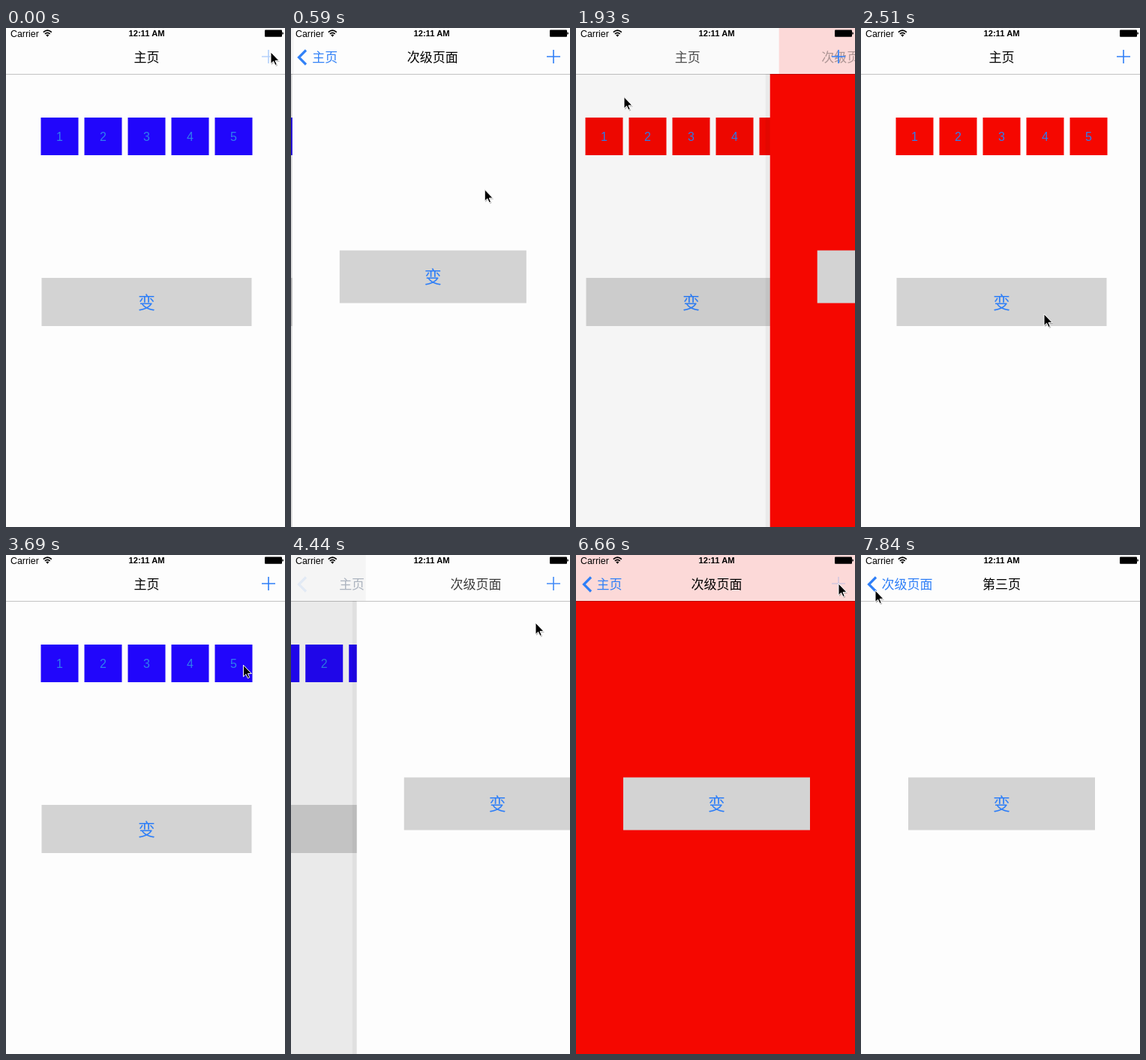
Recreate the animation shown at these times as an HTML page. Size 372 by 663 pixels, loop 7990 ms.

```html
<!DOCTYPE html>
<html lang="zh">
<head>
<meta charset="utf-8">
<title>Navigation demo</title>
<style>
  html, body { margin: 0; width: 100%; height: 100%; overflow: hidden; background: #fdfdfd; }
  svg { display: block; width: 372px; height: 663px; }
  text { font-family: "Liberation Sans", Arial, sans-serif; }
  .cjk { font-family: "Noto Sans CJK SC", "Noto Sans CJK", sans-serif; text-anchor: middle; }
  .title { font-size: 17px; font-weight: 500; }
  .back { font-size: 17px; fill: #2f7ff7; }
  .label { font-size: 23px; fill: #2f7ff7; }
  .digit { font-size: 16px; fill: #2f7fee; text-anchor: middle; }
</style>
</head>
<body>
<svg viewBox="0 0 372 663">
  <g id="pages"></g>
  <g id="bars"></g>
  <g id="titles"></g>
  <path id="chevron" d="M20 29.5L10.5 39L20 48.5" fill="none" stroke="#2f7ff7" stroke-width="3.2"/>
  <path id="plus" d="M341 38H359M350 29V47" stroke="#2f7ff7" stroke-width="1.6"/>
  <g>
    <text x="6" y="11.5" font-size="12.4">Carrier</text>
    <g fill="none" stroke="#000" stroke-width="1.7">
      <path d="M49.8 5.6Q55.3 .6 60.8 5.6"/>
      <path d="M51.9 7.9Q55.3 4.8 58.7 7.9"/>
    </g>
    <path d="M53.2 9.3Q55.3 7.6 57.4 9.3L55.3 11.7Z"/>
    <text x="187.5" y="11.3" font-size="11.2" font-weight="700" text-anchor="middle">12:11 AM</text>
    <rect x="345" y="2.5" width="23" height="9.3" rx="1"/>
    <path d="M368.4 5.2Q370 5.6 370 7Q370 8.4 368.4 8.8Z"/>
  </g>
  <g id="cursor">
    <path d="M1 1.5V17L4.6 13.7L7 19L9.3 18L7 12.9H12Z" opacity=".25"/>
    <path d="M0 0V15.5L3.6 12.2L6 17.5L8.3 16.5L6 11.4H11Z" stroke="#fff"/>
  </g>
</svg>
<script>
const W = 372, H = 663, BAR = 61, MID = 187.5;
const LOOP = 7990, STEP = 147.9, LAST = 53;
const WHITE = '#fdfdfd', RED = '#f50700', BLUE = '#2106fb', PINK = '#fcd9d8';
const $ = id => document.getElementById(id);
const clamp = v => Math.max(0, Math.min(1, v));
const smooth = k => k * k * (3 - 2 * k);

function set(el, attrs) {
  for (const k in attrs) el.setAttribute(k, attrs[k]);
}
function add(parent, tag, attrs, text) {
  const el = document.createElementNS('http://www.w3.org/2000/svg', tag);
  set(el, attrs);
  if (text) el.textContent = text;
  return parent.appendChild(el);
}
const rect = (parent, x, y, width, height, fill) =>
  add(parent, 'rect', { x, y, width, height, fill });

// Pages in stack order
const squares = [];
const pages = ['主页', '次级页面', '第三页'].map((name, i) => {
  const g = add($('pages'), 'g', {});
  if (i) rect(g, -6, BAR, 6, H, 'rgba(0,0,0,.045)');
  const bg = rect(g, 0, 0, W + 3, H, WHITE);
  rect(g, 0, BAR, W + 3, 1, 'rgba(0,0,0,.23)');
  if (i) {
    rect(g, 63, 295.5, 249, 70, '#d3d3d3');
  } else {
    for (let n = 0; n < 5; n++) {
      const x = 46.5 + 58 * n;
      squares.push(rect(g, x, 119, 50, 50, BLUE));
      add(g, 'text', { class: 'digit', x: x + 25, y: 150 }, String(n + 1));
    }
    rect(g, 47.5, 332, 280, 64, '#d3d3d3');
  }
  const label = add(g, 'text', { class: 'cjk label', x: MID, y: i ? 339.2 : 372.7 }, '变');
  const dim = rect(g, 0, 0, W + 3, H, '#000');
  const bar = rect($('bars'), 0, 0, W, BAR, WHITE);
  const barDim = rect($('bars'), 0, 0, W, BAR, '#000');
  const title = add($('titles'), 'text', { class: 'cjk title', y: 45.2 }, name);
  const back = add($('titles'), 'text', { class: 'cjk back', y: 45.2 }, name);
  return { g, bg, label, dim, bar, barDim, title, back, backX: 27.5 + 8.5 * name.length };
});

// Pointer moves: from time, to time, end x, end y
const moves = [
  [150, 900, 203, 321], [1180, 1620, 30, 42],
  [1780, 2360, 254, 368], [2360, 2510, 244, 380],
  [2960, 4140, 350, 38], [4290, 4437, 326, 90], [4437, 4880, 182, 348],
  [5030, 5700, 45, 44], [5770, 6370, 350, 38],
  [6800, 7400, 29, 142], [7400, 7840, 19, 47]
];
function pointer(t) {
  let x = 353, y = 32;
  for (const [from, to, endX, endY] of moves) {
    const k = smooth(clamp((t - from) / (to - from)));
    x += (endX - x) * k;
    y += (endY - y) * k;
  }
  return [x, y];
}

// Critically damped spring from 0 to 1
function spring(ms) {
  if (ms <= 0) return 0;
  if (ms > 600) return 1;
  const w = ms * 0.014;
  return 1 - (1 + w) * Math.exp(-w);
}
// Touch highlight: dim while held, then fade back
function press(t, down, up) {
  return t < down ? 1 : 0.2 + 0.8 * clamp((t - up) / 350);
}

function draw(t) {
  const depth = spring(t - 60) - spring(t - 1750) + spring(t - 4239) + spring(t - 6780);
  const red = (t > 1000 && t < 2400) || t > 5000;
  const squareFill = t > 1000 && t < 2950 ? RED : BLUE;
  squares.forEach(s => set(s, { fill: squareFill }));
  set(pages[1].bg, { fill: red ? RED : WHITE });
  set(pages[1].bar, { fill: red ? PINK : WHITE });
  set(pages[0].label, { opacity: press(t, 2800, 2900) });
  set(pages[1].label, { opacity: press(t, 900, 960) * press(t, 4800, 4945) });
  const backTouch = press(t, 1620, 1700);
  const plusTouch = press(t, -100, -66) * press(t, 4050, 4130) * press(t, 6600, 6740);
  const backShown = rel => clamp((rel - 0.74) / 0.26) * backTouch;

  pages.forEach((p, i) => {
    const rel = depth - i, under = clamp(rel);
    const x = -rel * W * (rel < 0 ? 1 : 0.3);
    const display = Math.abs(rel) < 1 ? 'inline' : 'none';
    set(p.g, { transform: `translate(${x} 0)`, display });
    set(p.dim, { opacity: under * 0.1 });

    const barX = rel < 0 ? Math.min(2 * x, x + 12) : 0;
    set(p.bar, { x: barX, display });
    set(p.barDim, { x: barX, display, opacity: under * 0.04 });

    const slide = rel < 0 ? -rel * 250 : (p.backX - MID) * Math.pow(under, 1.1);
    const gone = Math.max(0, rel - 1);
    set(p.title, { x: MID + slide, opacity: clamp(1 - Math.abs(rel)) });
    set(p.back, { x: MID + slide - gone * 100, opacity: backShown(rel) * clamp(1 - gone) });
  });

  set($('chevron'), { opacity: backShown(depth) });
  set($('plus'), { opacity: clamp(2 - depth) * plusTouch });
  set($('cursor'), { transform: `translate(${pointer(t)})` });
}

// The screen refreshes at a slow fixed rate
const start = performance.now();
function tick() {
  const now = (performance.now() - start) % LOOP;
  draw(Math.min(LAST, Math.floor((now + 8) / STEP)) * STEP);
  requestAnimationFrame(tick);
}
tick();
</script>
</body>
</html>
```
